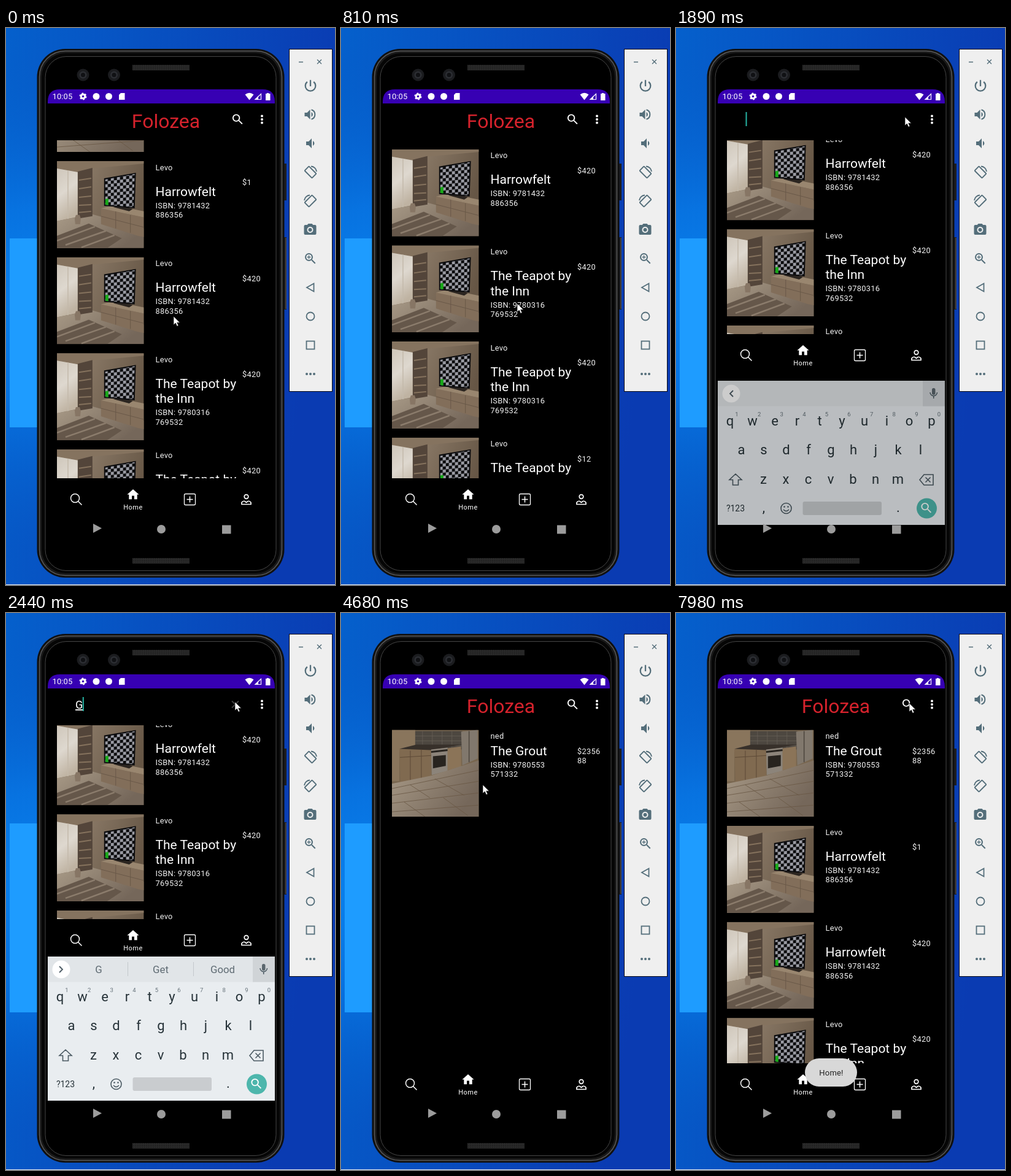
Write an HTML page that moves like this. It is 536x908 px and loops after 8 s.

```html
<!DOCTYPE html>
<html lang="en">
<head>
<meta charset="utf-8">
<title>Book list demo</title>
<style>
  html, body { margin: 0; width: 100%; height: 100%; overflow: hidden; background: #0a48b8; }
  svg { display: block; }
  #stage { width: 536px; height: 908px; font-family: Roboto, sans-serif; }
  .body { font-size: 12.8px; letter-spacing: .3px; fill: #f2f2f2; }
  .title { font-size: 21px; fill: #fff; }
  .brand { font-size: 32px; fill: #d5222c; text-anchor: middle; }
  .keys text { text-anchor: middle; fill: #263238; font-size: 22px; }
  .keys .hint { font-size: 9.5px; fill: #66727a; }
  .keys .word { font-size: 16.8px; fill: #5f6b73; }
  .line { fill: none; stroke: currentColor; }
</style>
</head>
<body>
<svg id="stage" viewBox="0 0 536 908">
  <defs>
    <linearGradient id="sky" x2="1" y2=".25">
      <stop offset="0" stop-color="#0560cc"/><stop offset="1" stop-color="#0a3bb2"/>
    </linearGradient>
    <radialGradient id="glow" gradientUnits="userSpaceOnUse" cx="60" cy="450" r="400">
      <stop offset="0" stop-color="#0a84f0"/><stop offset=".4" stop-color="#087ae8" stop-opacity=".75"/>
      <stop offset="1" stop-color="#0560cc" stop-opacity="0"/>
    </radialGradient>
    <linearGradient id="wall" x2="1" y2=".4">
      <stop offset="0" stop-color="#9a8976"/><stop offset="1" stop-color="#665645"/>
    </linearGradient>
    <linearGradient id="floor" x2="1" y2=".5">
      <stop offset="0" stop-color="#a89a87"/><stop offset="1" stop-color="#75675a"/>
    </linearGradient>
    <linearGradient id="window" x2=".3" y2="1">
      <stop offset="0" stop-color="#cfc7bb"/><stop offset=".5" stop-color="#ded8cf"/><stop offset="1" stop-color="#bfb3a2"/>
    </linearGradient>
    <pattern id="checker" width="10" height="10" patternUnits="userSpaceOnUse" patternTransform="translate(78 28) skewY(-6)">
      <path d="M0 0H10V10H0Z" fill="#0b0b0d"/><path d="M0 0H5V5H0ZM5 5H10V10H5Z" fill="#999aa2"/>
    </pattern>
    <pattern id="mesh" width="3" height="3" patternUnits="userSpaceOnUse">
      <path d="M0 0H3V3H0Z" fill="#2c2c2c"/><path d="M0 0H1.5V1.5H0Z" fill="#151515"/>
    </pattern>

    <symbol id="search" viewBox="0 0 24 24"><g class="line" stroke-width="2"><circle cx="9.5" cy="9.5" r="5.5"/><path d="M14 14l5.7 5.7"/></g></symbol>
    <symbol id="home" viewBox="0 0 24 24"><path d="M10 20v-6h4v6h5v-8h3L12 3 2 12h3v8z"/></symbol>
    <symbol id="power" viewBox="0 0 24 24"><path class="line" stroke-width="2.2" d="M12 3V13M7 6a8 8 0 1 0 10 0"/></symbol>
    <symbol id="soft" viewBox="0 0 24 24"><path d="M5 9v6h4l5 5V4L9 9zM16 8a4.5 4.5 0 0 1 0 8z"/></symbol>
    <symbol id="loud" viewBox="0 0 24 24"><path d="M3 9v6h4l5 5V4L7 9zM14 8a4.5 4.5 0 0 1 0 8z"/><path class="line" stroke-width="2" d="M14 4.3a8 8 0 0 1 0 15.4"/></symbol>
    <symbol id="turn" viewBox="0 0 24 24"><g class="line" stroke-width="1.9"><rect x="3.5" y="7" width="17" height="10" rx="1" transform="rotate(45 12 12)"/><path d="M13 2.500A9.500 9.500 0 0 1 22 11"/></g></symbol>
    <symbol id="camera" viewBox="0 0 24 24"><path fill-rule="evenodd" d="M9 2L7.2 4H4a2 2 0 0 0-2 2v12a2 2 0 0 0 2 2h16a2 2 0 0 0 2-2V6a2 2 0 0 0-2-2h-3.2L15 2zM12 7a5 5 0 1 1 0 10 5 5 0 0 1 0-10"/><circle cx="12" cy="12" r="3"/></symbol>

    <symbol id="room" viewBox="0 0 142 142">
      <path d="M0 0H142V142H0Z" fill="url(#wall)"/>
      <path d="M0 0H142V4L58 12 34 18 0 12Z" fill="#85735f"/>
      <path d="M0 12L34 18V91L0 98Z" fill="url(#window)"/>
      <path d="M18 15V95" stroke="#c3b9aa" stroke-width="1.5"/>
      <path d="M0 98L58 87 142 110V142H0Z" fill="url(#floor)"/>
      <path d="M34 17L58 11V90L34 94Z" fill="#53453a"/>
      <path d="M36 31L56 28M36 45L56 42M36 59L56 57M36 72L56 71M36 84L56 82" stroke="#85725d" stroke-width="2"/>
      <path d="M0 122L52 102 106 126 82 142H0Z" fill="#65574a"/>
      <path d="M0 130L62 107M14 137L80 114M40 141L94 121" stroke="#8b7c6c" stroke-width="2.5"/>
      <path d="M72 77L142 92V124L132 122 72 103Z" fill="#826e5a"/>
      <path d="M72 77L92 72 142 82V92Z" fill="#99866f"/>
      <path d="M72 90L142 108M96 82V110M120 88V117" stroke="#6a5949"/>
      <path d="M92 75L118 82 124 78 104 72Z" fill="#2b2520"/>
      <path d="M77 28L129 19 127 77 77 73Z" fill="#0d0d0f"/>
      <path d="M79 30L127 21 125 75 79 71Z" fill="url(#checker)"/>
      <path d="M79 62L84 61V72L79 71Z" fill="#18a818"/>
      <path d="M31 88h6l2 6-1 9h-8l-1-9z" fill="#877665"/>
    </symbol>
    <symbol id="kitchen" viewBox="0 0 142 142">
      <path d="M0 0H142V142H0Z" fill="#78664f"/>
      <path d="M0 0H38V28L12 36V84H0Z" fill="#89755c"/>
      <path d="M38 2H115V32H38Z" fill="#4d4740"/>
      <path d="M38 10H115M38 18H115M38 26H115M50 2V32M66 2V32M82 2V32M98 2V32" stroke="#69625a" stroke-width=".7"/>
      <path d="M12 32L64 28V76L14 87Z" fill="#806a50"/>
      <path d="M12 31L40 24H115L64 33Z" fill="#37302a"/>
      <path d="M30 34V83M48 32V79M13 45L64 42" stroke="#5d4a37"/>
      <path d="M64 32L91 29V67L65 74Z" fill="#8c847a"/>
      <path d="M67 43L88 41V59L67 63Z" fill="#28241f"/>
      <path d="M64 36L91 33" stroke="#28241f" stroke-width="3"/>
      <path d="M91 30L113 27V60L91 66Z" fill="#8b7458"/>
      <path d="M113 3L140 0V47L115 58Z" fill="#81786d"/>
      <path d="M126 2V53" stroke="#4b443c" stroke-width="1.5"/>
      <path d="M0 88L64 75 142 50V142H0Z" fill="url(#floor)"/>
      <path d="M0 96L142 66M0 107L142 84M0 120L142 103M0 134L142 123M30 90L62 111M70 80L118 107M20 118L54 142M84 111L124 140" stroke="#695744" stroke-width=".8"/>
    </symbol>
  </defs>

  <rect width="536" height="908" fill="url(#sky)"/>
  <rect width="536" height="908" fill="url(#glow)"/>
  <rect x="6" y="343" width="308" height="308" fill="#1e9cff"/>
  <rect y="907" width="536" height="1" fill="#f0f0f0"/>

  <!-- phone body -->
  <path d="M452 221h5v60h-5zM452 341h5v118h-5z" fill="#1d1d20"/>
  <path d="M456 342V458" stroke="#6d655a"/>
  <rect x="50.5" y="34" width="403" height="862" rx="46" fill="#101010"/>
  <rect x="54.5" y="37.5" width="395" height="855" rx="42" fill="#1a1a1a" stroke="#5a5a5a" stroke-width="1.5"/>
  <rect x="58" y="41" width="388" height="848" rx="39" fill="#060606"/>
  <rect x="64" y="46.5" width="376" height="838" rx="34" stroke="#444"/>
  <path d="M206 60h93v9h-93zM206 864h93v9h-93z" fill="url(#mesh)"/>
  <g fill="#1b1c1f">
    <circle cx="125.500" cy="76.500" r="10"/><circle cx="176" cy="76.500" r="10"/>
    <g fill="#2c2e33"><circle cx="125.500" cy="76.500" r="6"/><circle cx="176" cy="76.500" r="6"/></g>
    <g fill="#101114"><circle cx="125.500" cy="76.500" r="3.500"/><circle cx="176" cy="76.500" r="3.500"/></g>
  </g>

  <!-- screen -->
  <path d="M68 123V120Q68 100 88 100H418Q438 100 438 120V123V839H68Z"/>
  <path d="M68 123V120Q68 100 88 100H418Q438 100 438 120V123Z" fill="#3700b3"/>
  <g fill="#fff" color="#fff">
    <text x="75.5" y="116" font-size="13" letter-spacing=".1">10:05</text>
    <circle cx="125.5" cy="111.5" r="3.3" class="line" stroke-width="3"/>
    <circle cx="125.5" cy="111.5" r="5.2" class="line" stroke-width="1.6" stroke-dasharray="2.7 2.74"/>
    <circle cx="147" cy="111.5" r="5.5"/>
    <circle cx="167.5" cy="111.5" r="5.5"/>
    <path d="M187 106h6.500v11h-9.500v-8z"/>
    <path d="M389.500 108.500Q396.500 103 403.500 108.500L396.500 117.500Z"/>
    <path class="line" stroke-width="1.2" d="M415.500 107.500V116.500H406Z"/><path d="M405 117L411 111V117Z"/>
    <path d="M425 106h3v1h2.500v11h-7.500v-11h2z"/>
    <g id="bar"><text class="brand" x="260.5" y="163">Folozea</text><use href="#search" x="366" y="137.5" width="23" height="23"/></g>
    <circle cx="417" cy="143.5" r="2"/><circle cx="417" cy="149" r="2"/><circle cx="417" cy="154.5" r="2"/>
    <g id="field">
      <text id="query" x="113" y="156" font-size="18" text-decoration="underline"></text>
      <rect id="caret" y="137" width="2" height="23" fill="#26b5a5"/>
      <path id="clear" d="M368 143.500l11 11m0-11l-11 11" stroke="#444" stroke-width="1.8"/>
    </g>
  </g>
  <svg id="list" y="183" width="536" height="551"><g id="items"></g></svg>
  <g id="tabs" fill="#fff" color="#fff">
    <circle cx="112.5" cy="766.5" r="7" class="line" stroke-width="1.5"/><path class="line" stroke-width="1.5" d="M117.500 771.500l6 6"/>
    <use href="#home" x="195.5" y="748" width="23" height="25"/>
    <text x="207" y="785" text-anchor="middle" font-size="11" letter-spacing=".5">Home</text>
    <rect x="290.5" y="759.5" width="18" height="18" rx="2" class="line" stroke-width="1.3"/><path class="line" stroke-width="1.5" d="M299.500 763.500v10m-5-5h10"/>
    <g class="line" stroke-width="1.7"><circle cx="391.5" cy="764" r="3.3"/><path d="M384 776.500v-3q2-3 5-2l2.500 2 2.500-2q3-1 5 2v3z"/></g>
  </g>
  <g id="keyboard" class="keys" color="#4b5a63"></g>
  <path d="M142 808V823L156 815.500ZM352 810.500h14.500v14H352z" fill="#9c9c9c"/><circle cx="253" cy="817" r="7" fill="#9c9c9c"/>
  <g id="toast"><rect x="210" y="726" width="85" height="46" rx="23" fill="#d8d8d8"/><text x="253" y="754" text-anchor="middle" font-size="13" letter-spacing=".2" fill="#222">Home!</text></g>

  <!-- side panel -->
  <rect x="461.5" y="34.5" width="70" height="558" fill="#efefef" stroke="#0a0a12"/>
  <g fill="#546e7a" color="#546e7a">
    <path class="line" stroke-width="1.3" d="M477 55.500h7M507 51.500l7 7m0-7l-7 7"/>
    <use href="#power" x="483.5" y="81.5" width="25" height="25"/>
    <use href="#loud" x="483.5" y="129" width="24" height="24"/>
    <use href="#soft" x="484" y="176" width="24" height="24"/>
    <use href="#turn" x="484" y="223" width="24" height="24"/>
    <use href="#turn" x="-508" y="270" width="24" height="24" transform="scale(-1 1)"/>
    <use href="#camera" x="483.5" y="317" width="24" height="24"/>
    <use href="#search" x="484" y="364" width="24" height="24"/><path class="line" stroke-width="1.3" d="M493.500 370.500v6m-3-3h6"/>
    <g class="line" stroke-width="1.8"><path d="M501.500 416.500V429.500L490 423Z"/><circle cx="496" cy="470" r="6.5"/><rect x="489.5" y="510.5" width="13" height="13"/></g>
    <circle cx="490" cy="564" r="2"/><circle cx="496" cy="564" r="2"/><circle cx="502" cy="564" r="2"/>
  </g>

  <path id="pointer" d="M0 0V14L3.300 11 5.600 16.200 8 15.200 5.700 10.200H10.300Z" fill="#fff" stroke="#111" stroke-width=".7"/>
</svg>

<script>
const $ = id => document.getElementById(id);
const LOOP = 8000, PITCH = 156.6, PHOTO = 141.6;

// Book rows: seller, title lines, ISBN halves, price lines
const harrow = ['Levo', ['Harrowfelt'], ['9781432', '886356']];
const teapot = ['Levo', ['The Teapot by', 'the Inn'], ['9780316', '769532']];
const books = [
  ['ned', ['The Grout'], ['9780553', '571332'], ['$2356', '88']],
  [...harrow, ['$1']], [...harrow, ['$420']],
  [...teapot, ['$420']], [...teapot, ['$420']], [...teapot, ['$12']],
];

const label = (cls, x, y, text) => `<text class="${cls}" x="${x}" y="${y}">${text}</text>`;

function bookRow([seller, title, isbn, price], i) {
  const top = i ? 56.5 : 41, below = top + 20 + (title.length - 1) * 24.7;
  return `<g transform="translate(0 ${i * PITCH})">
    <use href="#${i ? 'room' : 'kitchen'}" x="83" width="${PHOTO}" height="${PHOTO}"/>
    ${label('body', 243.5, 14.5, seller)}
    ${title.map((s, n) => label('title', 243.5, top + n * 24.7, s)).join('')}
    ${label('body', 243.5, below, 'ISBN: ' + isbn[0])}${label('body', 243.5, below + 15.7, isbn[1])}
    ${price.map((s, n) => label('body', 385, 39 + n * 15.7, s)).join('')}</g>`;
}
$('items').innerHTML = books.map(bookRow).join('');
const rows = [...$('items').children];

function keyRow(letters, x, y) {
  return [...letters].map((c, i) => label('', x + i * 36.5, y, c)).join('');
}
$('keyboard').innerHTML = `
  <rect x="68" y="560" width="370" height="235" fill="#e9edf0"/>
  <rect x="68" y="560" width="370" height="41.5" fill="#e1e5e8"/>
  <rect x="402" y="560" width="36" height="41.5" fill="#d0d4d7"/>
  <circle cx="90" cy="581" r="14.5" fill="#fff"/>
  <path id="chevron" class="line" stroke-width="1.8"/>
  <path id="bars" d="M198.500 569V592M305.500 569V592" stroke="#c3c8cc"/>
  ${[151, 252, 353].map(x => label('word', x, 587, '')).join('')}
  <rect x="417" y="572" width="5.5" height="11" rx="2.7" fill="#5a666d"/>
  <path class="line" stroke-width="1.5" d="M414 579a5.700 5.700 0 0 0 11.500 0M419.700 585v4"/>
  ${keyRow('qwertyuiop', 88, 633)}${keyRow('asdfghjkl', 106.5, 680)}${keyRow('zxcvbnm', 142.5, 728)}
  ${[...'1234567890'].map((c, i) => label('hint', 99 + i * 36.6, 618, c)).join('')}
  <g class="line" stroke-width="1.6"><path d="M97 712L87 721.500H92.500V730H101.500V721.500H107ZM404 713H419V730H404L397 721.500ZM406.500 717.500l8 8m0-8l-8 8"/>
    <circle cx="179.5" cy="768" r="8.5"/><path d="M175 770q4.500 5 9 0"/></g>
  <circle cx="176.5" cy="765.5" r="1.3" fill="#4b5a63"/><circle cx="182.5" cy="765.5" r="1.3" fill="#4b5a63"/>
  <text x="97" y="773" style="font-size:14px">?123</text>
  ${label('', 143, 774, ',')}${label('', 362, 774, '.')}
  <rect x="206.5" y="757" width="128.5" height="22" rx="3" fill="#c9cccf"/>
  <circle cx="408.5" cy="768" r="16.5" fill="#4db6ac"/>
  <g color="#fff"><use href="#search" x="396.5" y="756" width="23" height="23"/></g>`;
const words = [...document.querySelectorAll('.word')];

// Stepped tracks: each entry holds from its time until the next one
const pointer = [
  [0, 273, 470], [140, 274, 540], [260, 278, 609], [540, 279, 575], [690, 283, 510], [810, 287, 449],
  [930, 305, 370], [1080, 360, 205], [1200, 378, 178], [1350, 381, 160], [1475, 377, 141], [1600, 373, 145],
  [4080, 395, 175], [4200, 416, 230], [4320, 375, 280], [4440, 300, 299], [4560, 222, 292], [4680, 231, 280],
  [4830, 321, 332], [4980, 238, 617], [5250, 257, 655], [5370, 250, 700], [5490, 236, 735], [5610, 220, 758],
  [5730, 210, 765], [7250, 187, 640], [7380, 257, 391], [7530, 260, 382], [7680, 360, 217], [7830, 383, 176], [7980, 380, 147],
];
const scroll = [[0, 130], [540, 160], [690, 235], [810, 305.8], [930, 326], [1080, 332], [3380, 0]];
const firstFade = [[0, 1], [3380, .6], [3500, 1]];
const restFade = [[0, 1], [3230, .45], [3380, 0], [6990, .5], [7110, 1]];
const toastFade = [[0, 0], [6990, .2], [7110, .5], [7250, .8], [7380, .92], [7530, 1]];
const keyboard = [[0, 0, 0], [1890, 15, .8], [2040, 0, 1], [3380, 29, .4], [3500, 0, 0]];
const typing = [[0, ''], [2440, 'G', 'Get', 'Good'], [2710, 'Gr', 'Great', 'Green'], [2830, 'Gro', 'Group', 'Grow'], [2980, 'Grout', 'Group', 'Groups']];

const at = (track, t) => track.findLast(step => step[0] <= t).slice(1);
const within = (t, from, to) => t >= from && t < to;
const show = (id, on) => $(id).style.display = on ? '' : 'none';

function draw(t) {
  $('pointer').setAttribute('transform', `translate(${at(pointer, t)})`);
  $('items').setAttribute('transform', `translate(0 ${7.5 - at(scroll, t)[0]})`);
  rows.forEach((row, i) => row.style.opacity = at(i ? restFade : firstFade, t)[0]);

  const searching = within(t, 1740, 3230), raised = within(t, 1890, 3380);
  show('bar', !searching);
  show('field', searching);
  $('list').setAttribute('height', raised ? 316 : 551);
  $('tabs').setAttribute('transform', `translate(0 ${raised ? -235 : 0})`);

  const [text, ...guesses] = at(typing, t);
  $('query').textContent = text;
  $('caret').setAttribute('x', searching && text ? 112.5 + $('query').getComputedTextLength() : 113.5);
  show('caret', !within(t, 2190, 2440));
  show('clear', text);
  show('bars', text);
  $('chevron').setAttribute('d', text ? 'M87 576l5 5-5 5' : 'M93 576l-5 5 5 5');
  words.forEach((word, i) => word.textContent = [text, ...guesses][i] ?? '');

  const [drop, alpha] = at(keyboard, t);
  $('keyboard').setAttribute('transform', `translate(0 ${drop})`);
  $('keyboard').style.opacity = alpha;
  $('toast').style.opacity = at(toastFade, t)[0];
}

const start = performance.now();
function tick() {
  draw((performance.now() - start) % LOOP);
  requestAnimationFrame(tick);
}
tick();
</script>
</body>
</html>
```
